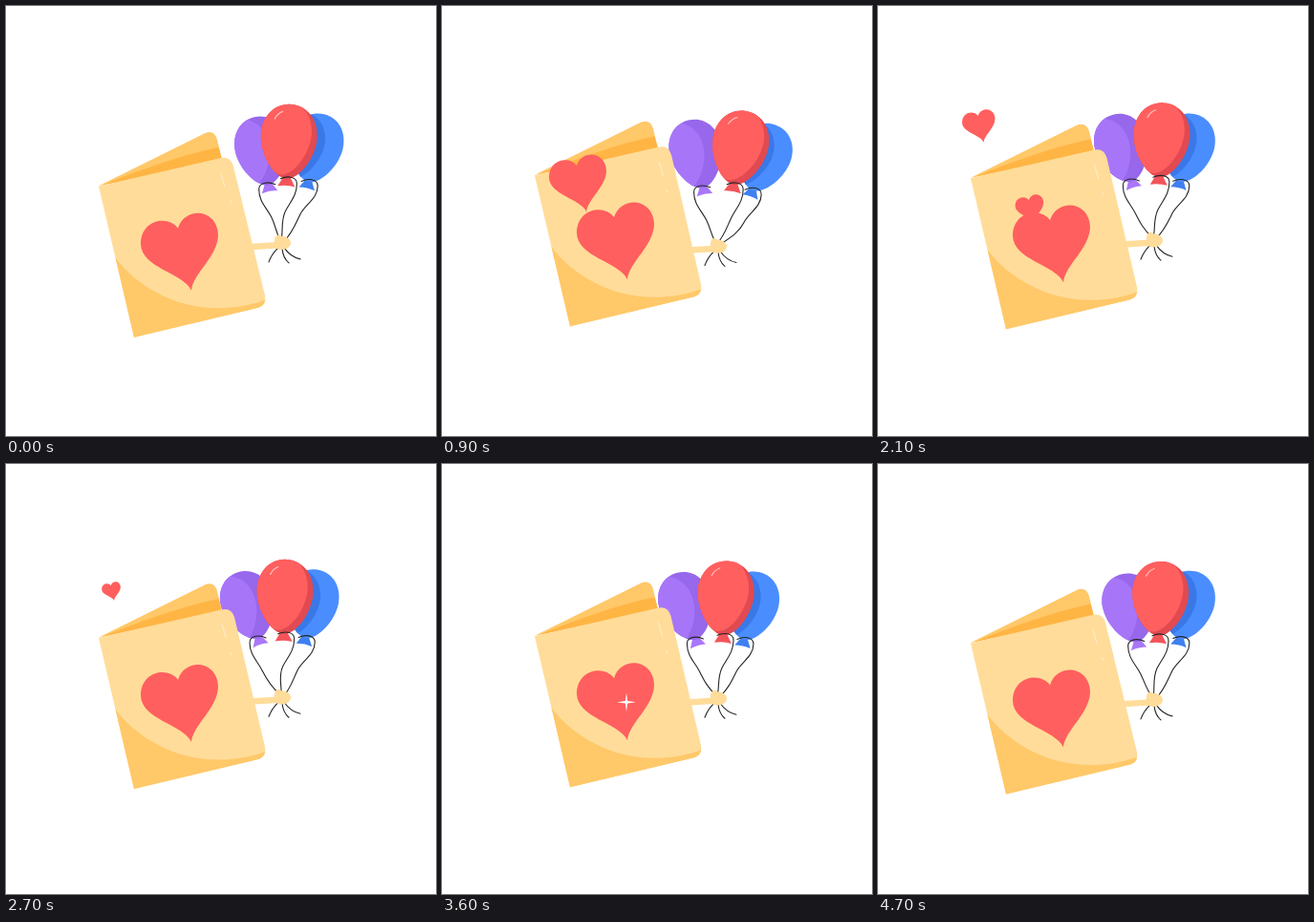
An HTML page with a canvas that plays this animation: 450x450 px, repeating every 4800 ms.

```html
<!DOCTYPE html>
<html lang="en">
<head>
<meta charset="utf-8">
<title>Greeting card</title>
<style>
html, body { margin: 0; width: 100%; height: 100%; overflow: hidden; background: #fff; }
canvas { display: block; }
</style>
</head>
<body>
<canvas id="stage" width="450" height="450"></canvas>
<script>
const ctx = document.getElementById('stage').getContext('2d');
const LOOP = 4800, STEP = 100;
const RED = '#ff5f5f', CREAM = '#ffdc99', AMBER = '#ffc869', ORANGE = '#ffb544', INK = '#252525';

// times at which the swing turns: rest, out, rest, out...
const turns = [250, 800, 1570, 2380, 3120, 3850];

// small hearts that rise out of the card
const flights = [
  { start: 407, span: 1400, from: 72, to: 38 },
  { start: 1318, span: 1130, from: 67, to: 20 },
  { start: 1832, span: 1340, from: 34, to: 12 }
];

const rad = deg => deg * Math.PI / 180;

// 0 at rest, 1 fully swung out
function swingAt(t) {
  if (t < turns[0]) t += LOOP;
  const marks = [...turns, turns[0] + LOOP];
  const i = marks.findIndex((m, k) => t < marks[k + 1]);
  const u = (t - marks[i]) / (marks[i + 1] - marks[i]);
  const ease = (1 - Math.cos(Math.PI * u)) / 2;
  return i % 2 ? 1 - ease : ease;
}

function fill(color, draw) {
  ctx.beginPath();
  draw();
  ctx.fillStyle = color;
  ctx.fill();
}

function stroke(color, width, draw) {
  ctx.beginPath();
  draw();
  ctx.strokeStyle = color;
  ctx.lineWidth = width;
  ctx.lineCap = 'round';
  ctx.stroke();
}

function heart(x, y, width) {
  ctx.save();
  ctx.translate(x, y);
  ctx.scale(width / 81, width / 81);
  fill(RED, () => {
    ctx.moveTo(-1.5, -24);
    ctx.bezierCurveTo(-11, -38, -40, -34, -40.5, -8);
    ctx.bezierCurveTo(-40, 18, 4, 22, 12.5, 41);
    ctx.bezierCurveTo(14, 23, 40, 6, 40.5, -17);
    ctx.bezierCurveTo(40, -44, 6, -48, -1.5, -24);
  });
  ctx.restore();
}

function frontPath(skew) {
  ctx.moveTo(97, 188);
  ctx.lineTo(224 + skew, 158.5);
  ctx.quadraticCurveTo(235 + skew, 156, 238 + skew, 167);
  ctx.lineTo(271, 302);
  ctx.quadraticCurveTo(273, 313, 262, 315.5);
  ctx.lineTo(134, 346);
  ctx.closePath();
}

function card(lift) {
  const skew = -lift * 0.2;
  ctx.save();
  ctx.translate(0, lift);
  fill(AMBER, () => {
    ctx.moveTo(97, 187.5);
    ctx.lineTo(208, 132.5);
    ctx.quadraticCurveTo(218, 128.5, 221, 139);
    ctx.lineTo(226, 160);
    ctx.closePath();
  });
  fill(ORANGE, () => {
    ctx.moveTo(100, 187);
    ctx.bezierCurveTo(140, 171, 180, 156, 222.5, 147);
    ctx.lineTo(226, 160);
    ctx.closePath();
  });
  fill(CREAM, () => frontPath(skew));
  ctx.save();
  ctx.beginPath();
  frontPath(skew);
  ctx.clip();
  fill(AMBER, () => {
    ctx.moveTo(114, 262);
    ctx.bezierCurveTo(145, 304, 208, 331, 274, 306);
    ctx.lineTo(274, 350);
    ctx.lineTo(120, 350);
    ctx.closePath();
  });
  ctx.restore();
  stroke('#ffebc6', 1.2, () => {
    ctx.moveTo(225 + skew, 174);
    ctx.lineTo(229 + skew, 188);
    ctx.moveTo(235, 203);
    ctx.lineTo(236, 206);
  });
  heart(181.5, 256, 81);
  ctx.restore();
}

function eggPath(x, y) {
  ctx.moveTo(x, y - 37);
  ctx.bezierCurveTo(x + 18, y - 37, x + 29.5, y - 22, x + 29.5, y - 4);
  ctx.bezierCurveTo(x + 29.5, y + 17, x + 13, y + 41, x, y + 41);
  ctx.bezierCurveTo(x - 13, y + 41, x - 29.5, y + 17, x - 29.5, y - 4);
  ctx.bezierCurveTo(x - 29.5, y - 22, x - 18, y - 37, x, y - 37);
}

function balloon(b) {
  ctx.save();
  ctx.translate(b.x, b.y);
  ctx.rotate(rad(b.tilt));
  ctx.scale(b.size, b.size);
  fill(b.knot, () => {
    ctx.moveTo(-3, 38);
    ctx.lineTo(3, 38);
    ctx.lineTo(9, 49);
    ctx.quadraticCurveTo(0, 47, -9, 49);
    ctx.closePath();
  });
  ctx.beginPath();
  eggPath(0, 0);
  ctx.fillStyle = b.base;
  ctx.fill();
  ctx.clip();
  fill(b.over, () => eggPath(b.dx, b.dy));
  if (b.shine) stroke('#ffb9b4', 1.3, () => {
    ctx.moveTo(-16, -21);
    ctx.quadraticCurveTo(-13, -27, -8, -29);
  });
  ctx.restore();
}

function cord(b, side, bend, handX, handY) {
  const d = 47 * b.size;
  const x = b.x - Math.sin(rad(b.tilt)) * d, y = b.y + Math.cos(rad(b.tilt)) * d;
  const edge = x + side * 11, mid = edge - side * bend;
  stroke(INK, 1.1, () => {
    ctx.moveTo(x - side * 6, y - 6);
    ctx.bezierCurveTo(x, y - 9, edge, y - 9, edge, y - 1);
    ctx.bezierCurveTo(edge, y + 12, mid + side * 5, y + 18, mid, y + 28);
    ctx.bezierCurveTo(mid - side * 5, y + 38, handX + (mid - handX) * 0.5, handY - 8, handX, handY);
  });
}

function hand(y) {
  stroke(INK, 1.1, () => {
    ctx.moveTo(284, y + 6);
    ctx.quadraticCurveTo(278, y + 12, 275, y + 20);
    ctx.moveTo(289, y + 6);
    ctx.quadraticCurveTo(290, y + 16, 296, y + 21);
    ctx.moveTo(291, y + 5);
    ctx.quadraticCurveTo(298, y + 15, 308, y + 17);
  });
  stroke(CREAM, 6.5, () => {
    ctx.moveTo(253, y + 4.5);
    ctx.lineTo(284, y + 2.5);
  });
  fill(CREAM, () => {
    ctx.moveTo(281, y - 2);
    ctx.bezierCurveTo(281, y - 9, 286, y - 9, 288, y - 7);
    ctx.bezierCurveTo(293, y - 7, 298, y - 4, 298, y);
    ctx.bezierCurveTo(298, y + 5, 292, y + 8, 286, y + 7);
    ctx.lineTo(280, y + 5);
    ctx.closePath();
  });
}

function flyingHeart({ start, span, from, to }, t) {
  const u = (t - start) / span;
  if (u <= 0 || u >= 1) return;
  const fade = Math.min(1, (1 - u) * 12);
  heart(180 - 108 * u, 247 - 176 * u, (from + (to - from) * u) * fade);
}

function sparkle(t, lift) {
  const u = (t - 3200) / 800;
  if (u <= 0 || u >= 1) return;
  const r = 10 * Math.sin(Math.PI * u), x = 193, y = 257 + lift;
  fill('#fff', () => {
    for (let k = 0; k < 8; k++) {
      const a = k * Math.PI / 4, d = k % 2 ? r * 0.17 : r;
      ctx.lineTo(x + Math.cos(a) * d, y + Math.sin(a) * d);
    }
  });
}

function draw(t) {
  const swing = swingAt(t), whip = swing ** 3.5;
  const settle = Math.max(0, Math.cos(2 * Math.PI * t / LOOP)) ** 8;
  const lift = 2 - 13.3 * swing;
  const handY = 249 + 4.5 * whip - 11 * swing * (1 - whip);
  const rx = 287 + 29 * whip + 9 * settle, ry = handY - 108 + 3.5 * whip;
  const px = rx - 11 - 36 * Math.sqrt(swing) - 6 * settle;
  const bx = rx + 29 - 4 * whip;

  const purple = { x: px, y: ry + 10 - 4 * whip, tilt: -7 - (276 - px) * 0.45, size: 0.93,
    base: '#9767ec', over: '#a776f8', knot: '#a977fa', dx: -20, dy: 0 };
  const blue = { x: bx, y: ry + 7 + 4 * whip, tilt: 9 + (bx - 317) * 0.5, size: 0.93,
    base: '#4a8dff', over: '#3a78e8', knot: '#3f80f2', dx: -21, dy: 2 };
  const red = { x: rx, y: ry, tilt: (rx - 288) * 0.4, size: 1,
    base: '#e14a50', over: RED, knot: '#f3545a', dx: -6, dy: -4, shine: true };

  ctx.fillStyle = '#fff';
  ctx.fillRect(0, 0, 450, 450);
  [purple, blue, red].forEach(balloon);
  cord(purple, -1, 13, 287, handY - 3);
  cord(red, 1, 12, 288, handY - 3);
  cord(blue, 1, 18, 291, handY - 2);
  hand(handY);
  card(lift);
  flights.forEach(f => flyingHeart(f, t));
  sparkle(t, lift);
}

const start = performance.now();
function tick() {
  const t = (performance.now() - start) % LOOP;
  draw(Math.floor(t / STEP) * STEP);
  requestAnimationFrame(tick);
}
tick();
</script>
</body>
</html>
```
